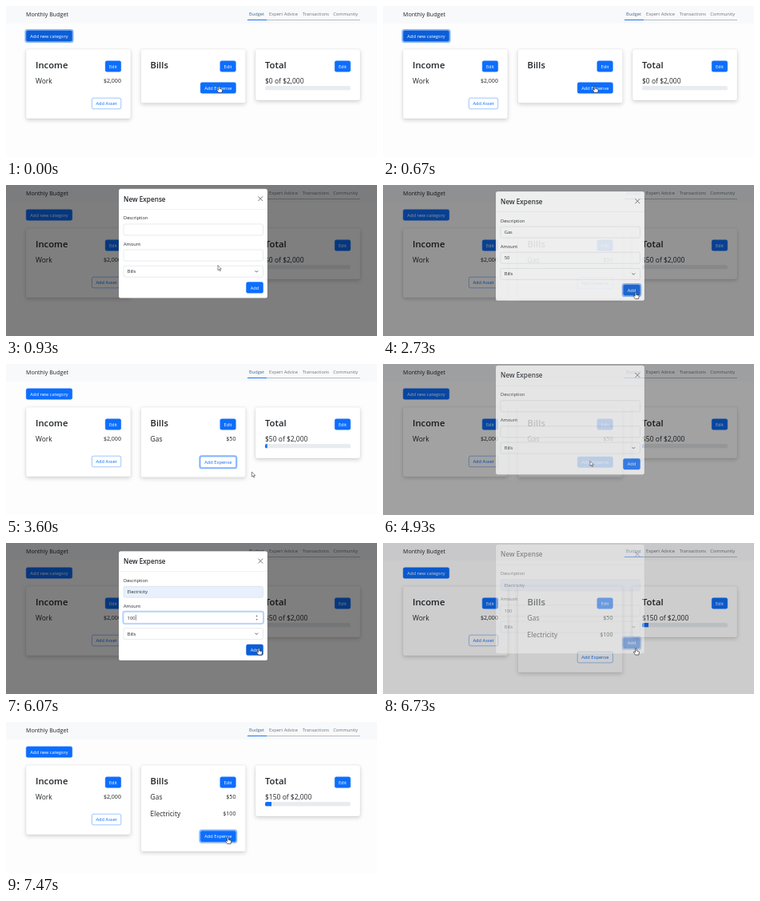
These frames come from a looping animation (464 px wide and 189 px high, 8 s). An HTML page:

```html
<!DOCTYPE html>
<html lang="en">
<head>
<meta charset="utf-8">
<title>Monthly Budget</title>
<style>
  html, body { margin: 0; width: 100%; height: 100%; overflow: hidden; background: #fdfdfe; }
  svg { display: block; width: 100vw; height: 100vh; }
  text { font-family: "Open Sans", "Noto Sans", sans-serif; white-space: pre; }
  .card { filter: drop-shadow(0 2.6px 2.8px rgba(0, 0, 0, .16)); }
</style>
</head>
<body>
<svg id="stage" viewBox="0 0 464 189"></svg>
<script>
const LOOP = 8000, FADE = 150, SLIDE = 300, DROP = 18.6, BUDGET = 2000;
const BLUE = '#0d6efd', DARK = '#0b5ed7', INK = '#212529';
const BODY = 5.7, ROW = 8.5;

const visits = [
  { open: 780, close: 2708, name: 'Gas', cost: 50,
    nameFocus: 1250, nameAt: 1660, nameStep: 66, costFocus: 1995, costAt: 2060, press: 2395 },
  { open: 4822, close: 6640, name: 'Electricity', cost: 100, autofill: true,
    nameFocus: 5390, nameAt: 5525, nameStep: 0, costFocus: 5595, costAt: 5725, press: 6265 },
];

// Pointer stops: time, x, y
const stops = [
  [0, 266.5, 100.5], [780, 265, 100.5], [990, 265, 100.5], [1260, 217, 60],
  [2000, 217, 60], [2200, 316, 134], [2850, 316, 134.5], [3130, 307.5, 135],
  [3590, 307.5, 135], [4070, 259, 121.5], [5130, 259, 121.5], [5390, 230, 60],
  [5750, 230, 60], [6060, 316.3, 132], [6800, 316.3, 132], [7400, 277.5, 144.5], [LOOP, 277.5, 144.5],
];

const stage = document.getElementById('stage');
const ruler = document.createElement('canvas').getContext('2d');
const clamp = v => Math.min(1, Math.max(0, v));
const easeOut = v => Math.sin(clamp(v) * Math.PI / 2);
const within = (p, x, y, w, h) => p.x >= x && p.x <= x + w && p.y >= y && p.y <= y + h;

function textWidth(str, size) {
  ruler.font = '100px "Open Sans", "Noto Sans", sans-serif';
  return ruler.measureText(str).width * size / 100;
}

function pointerAt(t) {
  const i = stops.findIndex(s => s[0] > t);
  const [t0, x0, y0] = stops[i - 1], [t1, x1, y1] = stops[i];
  const k = (1 - Math.cos(Math.PI * (t - t0) / (t1 - t0))) / 2;
  return { x: x0 + (x1 - x0) * k, y: y0 + (y1 - y0) * k };
}

const rect = (x, y, w, h, fill, extra = '') =>
  `<rect x="${x}" y="${y}" width="${w}" height="${h}" fill="${fill}" ${extra}/>`;
const text = (str, x, y, size, extra = '') =>
  `<text x="${x}" y="${y}" font-size="${size}" fill="${INK}" ${extra}>${str}</text>`;
const money = (n, right, y) =>
  text('$' + n.toLocaleString('en-US'), right, y, 7.12, 'text-anchor="end"');
const heading = (str, x) => text(str, x, 78, 11.3, 'font-weight="600"');
const ring = (x, y, w, h, alpha) =>
  rect(x - .8, y - .8, w + 1.6, h + 1.6, 'none', `rx="2.6" stroke="${BLUE}" stroke-opacity="${alpha}" stroke-width="1.5"`);

function button(label, x, y, w, { outline, hover, focus } = {}) {
  const filled = !outline || hover;
  const fill = !filled ? '#fff' : hover && !outline ? DARK : BLUE;
  return (focus ? ring(x, y, w, 14, .5) : '') +
    rect(x + .2, y + .2, w - .4, 13.6, fill, `rx="2" stroke="${filled ? fill : BLUE}" stroke-width=".4"`) +
    `<text x="${x + w / 2}" y="${y + 9.1}" font-size="${BODY}" text-anchor="middle" fill="${filled ? '#fff' : BLUE}">${label}</text>`;
}

const card = (x, h) =>
  rect(x, 54, 131, h, '#fff', 'class="card" rx="2.2" stroke="#000" stroke-opacity=".13" stroke-width=".4"');

function field(y, value, { focus, caret, fill = '#fff' } = {}) {
  const caretX = 152.3 + textWidth(value, BODY);
  return (focus ? ring(147, y, 174.5, 14, .3) : '') +
    rect(147, y, 174.5, 14, fill, `rx="2" stroke="${focus ? '#86b7fe' : '#ced4da'}" stroke-width=".5"`) +
    text(value, 151.8, y + 9.1, BODY) +
    (focus && caret ? rect(caretX, y + 3.5, .5, 7, INK) : '');
}

function nav() {
  const links = [['Budget', 304], ['Expert Advice', 329], ['Transactions', 370.7], ['Community', 409.2]];
  return rect(0, 0, 464, 22, '#f8f9fb') + text('Monthly Budget', 25, 13.4, 7.12) +
    rect(302, 17.1, 141, .6, '#8c97a5') + rect(302, 16.9, 24, .9, BLUE) +
    links.map(([label, x], i) =>
      `<text x="${x}" y="12.2" font-size="${BODY}" fill="${i ? '#6c757d' : '#47688f'}">${label}</text>`).join('');
}

function page(expenses, focus, pointer) {
  const spent = expenses.reduce((sum, e) => sum + e.cost, 0);
  const buttonY = 95.5 + expenses.length * 20.3;
  const overExpense = within(pointer, 243, buttonY, 44.7, 14);
  const rows = expenses.map((e, i) =>
    text(e.name, 180.5, 97 + i * 21, ROW) + money(e.cost, 287.5, 96.3 + i * 21)).join('');
  return {
    overExpense,
    markup: rect(0, 0, 464, 189, '#fdfdfe') + nav() +
      button('Add new category', 25, 30.5, 58, { hover: focus === 'category', focus: focus === 'category' }) +
      card(25, 87) + heading('Income', 37) + button('Edit', 124, 68.5, 20) +
      text('Work', 37, 97, ROW) + money(BUDGET, 144, 96.3) +
      button('Add Asset', 107.3, 115, 36.7, { outline: true }) +
      card(168.7, 67.5 + expenses.length * 20.3) + heading('Bills', 180.5) + button('Edit', 267.6, 68.5, 20) + rows +
      button('Add Expense', 243, buttonY, 44.7, { outline: true, hover: overExpense, focus: focus === 'expense' }) +
      card(312, 64) + heading('Total', 324) + button('Edit', 411, 68.5, 20) +
      text(`$${spent} of $2,000`, 324, 97, ROW) +
      `<clipPath id="track">${rect(324, 100, 107, 5.6, '#000', 'rx="2.2"')}</clipPath>` +
      `<g clip-path="url(#track)">${rect(324, 100, 107, 5.6, '#e9ecef')}${rect(324, 100, 107 * spent / BUDGET, 5.6, BLUE)}</g>`,
  };
}

function modal(t, v, pointer) {
  const closing = t >= v.close;
  const fade = closing ? 1 - clamp((t - v.close) / FADE) : clamp((t - v.open) / FADE);
  const lift = closing ? easeOut((t - v.close) / SLIDE) : 1 - easeOut((t - v.open) / SLIDE);
  const typed = (str, start, step) =>
    t < start ? '' : step ? str.slice(0, 1 + Math.floor((t - start) / step)) : str;
  const name = typed(v.name, v.nameAt, v.nameStep);
  const cost = typed(String(v.cost), v.costAt, 67);
  const onCost = t >= v.costFocus && t < v.press;
  const onName = t >= v.nameFocus && t < v.costFocus;
  const spinner = 'M312.4 91.9l1.2-1.4 1.2 1.4zM312.4 95.3l1.2 1.4 1.2-1.4z';
  return rect(0, 0, 464, 189, '#000', `opacity="${.5 * fade}"`) +
    `<g opacity="${fade}" transform="translate(0 ${-DROP * lift})">` +
    rect(141, 10.2, 186, 136.8, '#fff', 'rx="2.6" stroke="#000" stroke-opacity=".2" stroke-width=".4"') +
    text('New Expense', 147, 25.9, 8.2, 'font-weight="600"') +
    '<path d="M315.7 19.9l5.2 5.2m0-5.2l-5.2 5.2" stroke="#666" stroke-width=".9" stroke-linecap="round"/>' +
    rect(141, 35.4, 186, .4, '#dee2e6') +
    text('Description', 147, 48.8, BODY) +
    field(54.3, name, { focus: onName, caret: true, fill: v.autofill && name ? '#e8f0fe' : '#fff' }) +
    text('Amount', 147, 81, BODY) + field(86.4, cost, { focus: onCost, caret: true }) +
    (onCost ? `<path d="${spinner}" fill="#555"/>` : '') +
    field(106.6, 'Bills') +
    '<path d="M311.6 112.7l1.8 1.8 1.8-1.8" fill="none" stroke="#343a40" stroke-width=".8"/>' +
    button('Add', 300.3, 126.8, 21.5, { hover: overAdd(pointer), focus: t >= v.press }) + '</g>';
}

const overAdd = p => within(p, 300.3, 126.8, 21.5, 14);

function cursor({ x, y }, shape) {
  const paths = {
    arrow: '<path d="M0 0V6.2L1.5 4.9 2.5 7.2 3.4 6.8 2.4 4.6H4.4z" fill="#fff" stroke="#222" stroke-width=".5"/>',
    hand: '<path d="M-.8.6a.8.8 0 0 1 1.6 0V3l2.6.6q.9.3.8 1.2L3.6 8H-.6L-2.8 5q-.4-.9.6-1l1.4.8z" fill="#fff" stroke="#111" stroke-width=".6"/>',
    beam: '<path d="M-1-3h2M0-3v6M-1 3h2" fill="none" stroke="#333" stroke-width=".5"/>',
  };
  return `<g transform="translate(${x} ${y})">${paths[shape]}</g>`;
}

function scene(t) {
  const pointer = pointerAt(t);
  const visit = visits.find(v => t >= v.open && t < v.close + FADE);
  const busy = visits.some(v => t >= v.open && t < v.close + SLIDE);
  const focus = busy ? '' : t < 720 ? 'category' : 'expense';
  const { markup, overExpense } = page(visits.filter(v => t >= v.close - 40), focus, pointer);
  let shape = overExpense ? 'hand' : 'arrow';
  if (visit) {
    const overField = within(pointer, 147, 54, 174, 14) || within(pointer, 147, 86.4, 174, 13.9);
    shape = overAdd(pointer) ? 'hand' : overField ? 'beam' : 'arrow';
  }
  return markup + (visit ? modal(t, visit, pointer) : '') + cursor(pointer, shape);
}

let shown = '';
const start = performance.now();
function frame() {
  const next = scene((performance.now() - start) % LOOP);
  if (next !== shown) stage.innerHTML = shown = next;
  requestAnimationFrame(frame);
}
frame();
</script>
</body>
</html>
```
